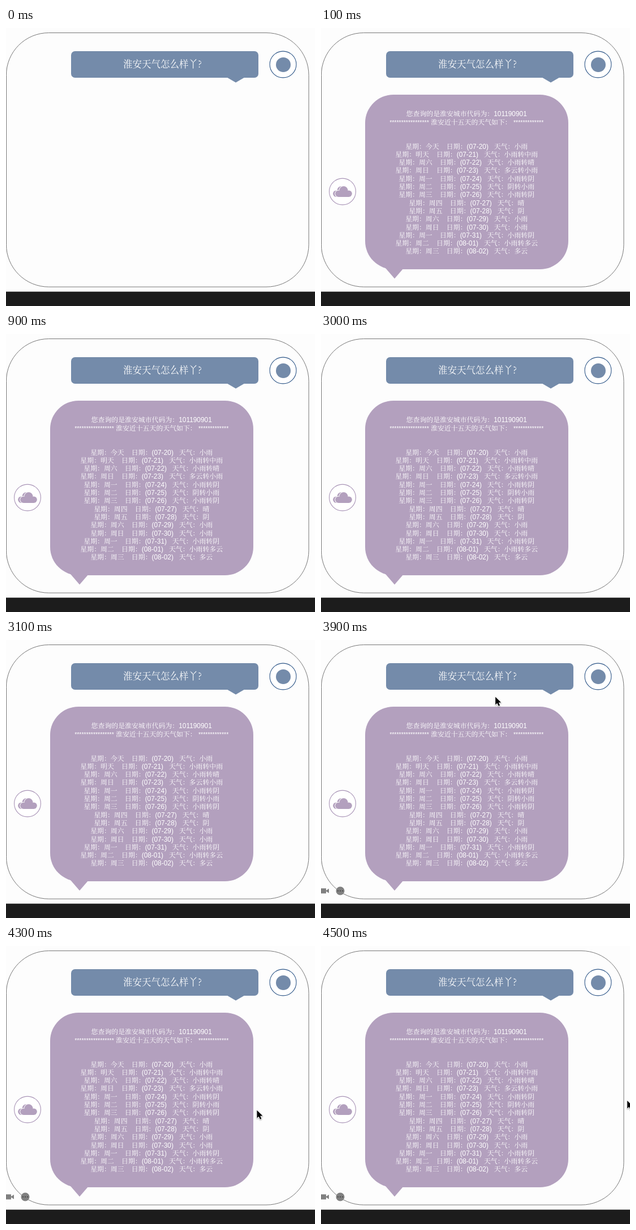
An HTML page with a canvas that plays this animation: 546x492 px, repeating every 4600 ms.

```html
<!DOCTYPE html>
<html lang="zh-CN">
<head>
<meta charset="utf-8">
<title>天气对话</title>
<style>
html, body { margin: 0; width: 100%; height: 100%; overflow: hidden; background: #fdfdfd; }
canvas { display: block; }
</style>
</head>
<body>
<canvas id="stage" width="546" height="492"></canvas>
<script>
const ctx = document.getElementById('stage').getContext('2d');
const LOOP = 4600, STEP = 100;
const BLUE = '#748baa', PURPLE = '#b3a0be', PAPER = '#fdfdfd';
const HAN = '"Noto Serif CJK SC", "Noto Sans CJK SC", "Noto Sans CJK", serif';
const LATIN = '"Liberation Sans", Arial, sans-serif';
const SIZE = 11.9, LEADING = 14.3, CENTER = 257.2;

const skies = '小雨 小雨转中雨 小雨转晴 多云转小雨 小雨转阴 阴转小雨 小雨转阴 晴 阴 小雨 小雨 小雨转阴 小雨转多云 多云'.split(' ');

function forecast(sky, i) {
  const date = new Date(2023, 6, 20 + i);
  const pad = n => String(n).padStart(2, '0');
  const day = ['今天', '明天'][i] || '周' + '日一二三四五六'[date.getDay()];
  return `星期：${day}    日期：(${pad(date.getMonth() + 1)}-${pad(date.getDate())})   天气：${sky}`;
}

function disc(x, y, r, fill, stroke) {
  ctx.beginPath();
  ctx.arc(x, y, r, 0, Math.PI * 2);
  ctx.fillStyle = fill;
  ctx.fill();
  if (!stroke) return;
  ctx.strokeStyle = stroke;
  ctx.lineWidth = 1.1;
  ctx.stroke();
}

function box(x, y, w, h, color) {
  ctx.fillStyle = color;
  ctx.fillRect(x, y, w, h);
}

function polygon(...points) {
  ctx.beginPath();
  points.forEach(([x, y]) => ctx.lineTo(x, y));
  ctx.closePath();
}

function bubble(x, y, w, h, r, tailX, tailW, tailH, color) {
  const base = y + h;
  ctx.fillStyle = color;
  ctx.beginPath();
  ctx.roundRect(x, y, w, h, r);
  ctx.fill();
  polygon([tailX - tailW, base - 2], [tailX + tailW, base - 2], [tailX, base + tailH]);
  ctx.fill();
}

function setFont(text, size) {
  const han = /[^\x00-\x7f?]/.test(text);
  ctx.font = han ? `200 ${size}px ${HAN}` : `${size}px ${LATIN}`;
}

// Centres a line of mixed Chinese and Latin runs
function line(text, y, size = SIZE, center = CENTER) {
  const runs = text.match(/[^\x00-\x7f]+\??|\*+|[^*\u0080-\uffff]+/g).map(part => {
    const px = part[0] === '*' ? size * 0.885 : size;
    setFont(part, px);
    return { part, px, width: ctx.measureText(part).width };
  });
  let x = center - runs.reduce((sum, run) => sum + run.width, 0) / 2;
  ctx.fillStyle = '#fff';
  for (const { part, px, width } of runs) {
    setFont(part, px);
    ctx.fillText(part, x, y);
    x += width;
  }
}

function cloud(x, base, grow, color) {
  for (const side of [-1, 0, 1]) {
    const r = side ? 5.8 : 7.5;
    disc(x + side * 9, base - r - (side ? 0 : 4), r + grow, color);
  }
  box(x - 9, base - 8, 18, 8 + grow, color);
}

function question() {
  bubble(115, 41, 331, 47, 7, 406, 18, 8.5, BLUE);
  line('淮安天气怎么样丫?', 70, 16.5, 276.5);
  disc(489.5, 64.5, 23.4, '#fff', '#2f5788');
  disc(490, 65, 13, BLUE);
}

function answer() {
  const top = 156.3;
  bubble(78, 118, 359, 309, 50, 130, 16, 16.5, PURPLE);
  line('您查询的是淮安城市代码为：101190901', top);
  line('*'.repeat(17) + ' 淮安近十五天的天气如下： ' + '*'.repeat(13), top + LEADING);
  skies.forEach((sky, i) => line(forecast(sky, i), top + LEADING * (i + 4)));

  disc(38, 289.5, 23.4, '#fff', '#a893b6');
  cloud(36, 299, 0, PURPLE);
  cloud(40, 299, 0.9, '#fff');
  cloud(40, 299, 0, PURPLE);
}

function controls() {
  const grey = '#808080';
  box(0, 439.5, 9, 9, grey);
  polygon([8, 444], [14, 440], [14, 448]);
  ctx.fill();
  disc(34, 444, 7.5, grey);
  for (const side of [-1, 0, 1]) disc(34 + side * 4, 444, 1.1, '#444');
}

function pointer(x, y) {
  ctx.save();
  ctx.translate(x + 0.5, y + 1);
  ctx.scale(0.86, 0.86);
  polygon([0.8, 0.8], [0.8, 17], [4.5, 13.6], [7.2, 19.6], [10, 18.4], [7.4, 12.5], [12.4, 12.3]);
  ctx.strokeStyle = '#fff';
  ctx.lineWidth = 2;
  ctx.lineJoin = 'round';
  ctx.shadowColor = 'rgba(0,0,0,.35)';
  ctx.shadowBlur = 2;
  ctx.shadowOffsetY = 1;
  ctx.stroke();
  ctx.shadowColor = 'transparent';
  ctx.fillStyle = '#000';
  ctx.fill();
  ctx.restore();
}

const progress = (t, from, to) => Math.min(1, Math.max(0, (t - from) / (to - from)));

// Slows into the answer, then speeds off to the right
function movePointer(t) {
  const inward = 1 - (1 - progress(t, 3900, 4100)) ** 1.5;
  const outward = progress(t, 4200, 4500) ** 1.5;
  pointer(307 + 112 * inward + 121 * outward, 99 + 194 * inward - 21 * outward);
}

function draw(t) {
  box(0, 0, 546, 492, PAPER);
  ctx.beginPath();
  ctx.roundRect(0.5, 8.5, 534.5, 449.7, 75);
  ctx.strokeStyle = '#777';
  ctx.lineWidth = 1;
  ctx.stroke();
  box(0, 466.6, 546, 26, '#1c1c1c');

  question();
  if (t >= 100) answer();
  if (t >= 3900) {
    controls();
    movePointer(t);
  }
}

const start = performance.now();
function tick() {
  const t = (performance.now() - start) % LOOP;
  draw(Math.floor(t / STEP) * STEP);
  requestAnimationFrame(tick);
}
tick();
</script>
</body>
</html>
```
